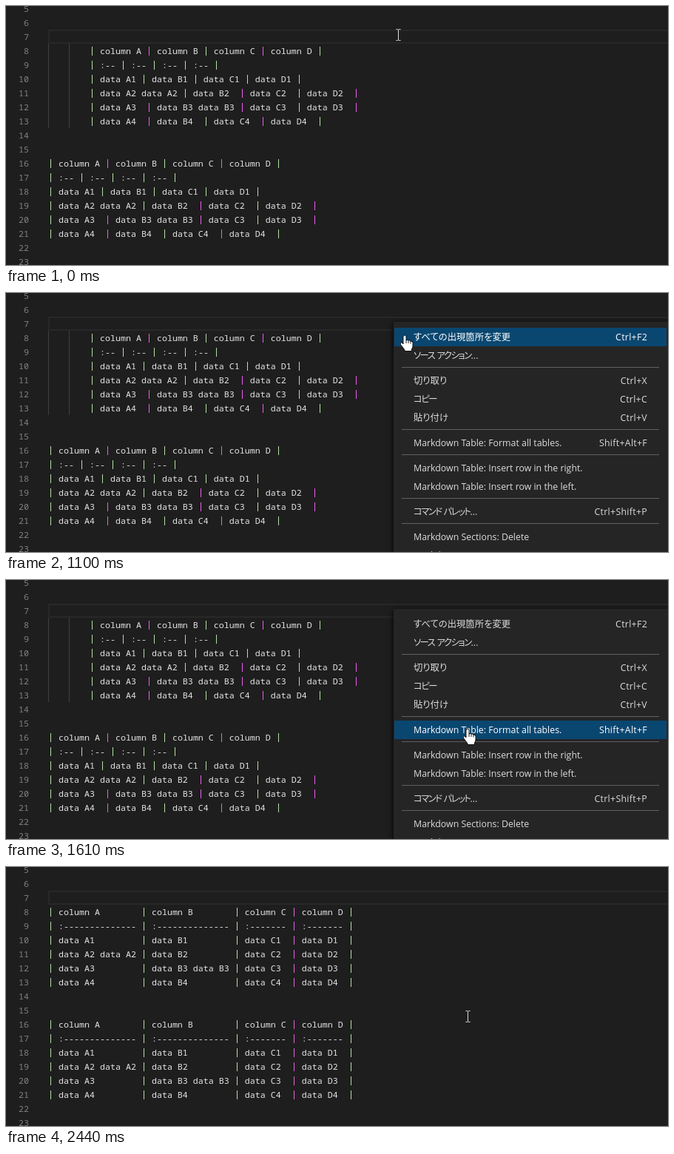
An HTML page that plays this animation: 895 px wide and 350 px high, repeating every 2820 ms.

```html
<!DOCTYPE html>
<html lang="ja">
<head>
<meta charset="utf-8">
<title>Format tables</title>
<style>
html, body { margin: 0; width: 100%; height: 100%; overflow: hidden; background: #1e1e1e; }
#stage { position: absolute; left: 0; top: 0; width: 895px; height: 350px; overflow: hidden; }
#stage div, #stage svg { position: absolute; }
.line, .num {
  font: 11.667px/19px "Noto Sans Mono", monospace; font-variant-ligatures: none;
  height: 19px; white-space: pre; color: #e4e4e4;
}
.line { left: 57px; }
.num { left: 0; width: 31px; text-align: right; color: #808080; }
.line i {
  display: inline-block; width: 7px; height: 19px; vertical-align: top; color: transparent;
  background: linear-gradient(#b4e0a8, #b4e0a8) 3px 4px / 1px 12px no-repeat;
}
.line i.odd { background-image: linear-gradient(#ee5cee, #ee5cee); }
#current { left: 57px; top: 32px; width: 860px; height: 15px; border: 2px solid #282828; }
#caret { left: 57px; top: 32px; width: 2px; height: 19px; background: #aeafad; }
.guide { top: 51px; width: 1px; height: 114px; background: #404040; }
#menu { left: 524px; top: 39px; width: 371px; height: 330px; background: #252526; box-shadow: 0 2px 8px #000; }
.item {
  left: 1px; width: 368px; height: 25px; color: #dcdcdc; white-space: pre;
  font: 12.35px/26px "Open Sans", "Noto Sans CJK JP", sans-serif; font-feature-settings: "palt";
}
.item.on { background: #094771; color: #fff; }
.item span { position: absolute; left: 26px; }
.item span + span { left: auto; right: 26px; letter-spacing: .3px; }
.item b { font-weight: 400; letter-spacing: -1.5px; }
.rule { left: 11px; width: 348px; height: 1px; background: #606061; }
#click { width: 24px; height: 24px; margin: -12px; border-radius: 50%; background: rgba(255, 255, 0, .5); }
#pointer { left: 0; top: 0; overflow: visible; }
</style>
</head>
<body>
<div id="stage">
  <div id="current"></div>
  <div class="guide" style="left:57px"></div>
  <div class="guide" style="left:85px"></div>
  <div id="text"></div>
  <div id="caret"></div>
  <div id="menu"></div>
  <div id="click"></div>
  <svg id="pointer" width="1" height="1">
    <path id="beam" fill="none" stroke="#dedede" d="M-3-7.5H-1L0-7L1-7.5H3M0-7V7M-3 7.5H-1L0 7L1 7.5H3"/>
    <path id="arrow" fill="#fff" stroke="#000" stroke-width=".8" d="M0 0V16.5L3.8 13L6.5 19L9 18L6.4 12H11.7Z"/>
    <path id="hand" fill="#fff" stroke="#000" stroke-width=".9" d="M-2 2Q-2 0 0 0Q2 0 2 2V7Q3 6 5 7Q7 6.6 8 8Q11 8 11 10.5V15Q11 17 9.5 19V21.5H0V20L-5.5 12.5Q-6.5 10.5-4.5 10Q-3 10-2 12ZM2 7V11M5 7.3V11M8 8V11.5"/>
  </svg>
</div>
<script>
const $ = id => document.getElementById(id);
const LOOP = 2820;

const loose = [
  '| column A | column B | column C | column D |',
  '| :-- | :-- | :-- | :-- |',
  '| data A1 | data B1 | data C1 | data D1 |',
  '| data A2 data A2 | data B2  | data C2  | data D2  |',
  '| data A3  | data B3 data B3 | data C3  | data D3  |',
  '| data A4  | data B4  | data C4  | data D4  |'
];

function format(lines) {
  const rows = lines.map(l => l.split('|').slice(1, -1).map(c => c.trim()));
  const widths = rows[0].map((_, i) => Math.max(...rows.map(r => r[i].length)));
  return rows.map(r => '| ' + r.map((c, i) =>
    c.padEnd(widths[i], c[0] === ':' ? '-' : ' ')).join(' | ') + ' |');
}

function add(parent, cls, top, html) {
  const el = document.createElement('div');
  el.className = cls;
  el.style.top = top + 'px';
  el.innerHTML = html;
  parent.append(el);
  return el;
}

const lineTop = n => 32 + (n - 7) * 19;
const paint = s => s.replace(/\|/g, (_, i) => `<i class="${i % 2 ? 'odd' : ''}">|</i>`);

function addTables(first, second) {
  const group = add($('text'), '', 0, '');
  first.forEach((s, i) => add(group, 'line', lineTop(8 + i), paint(s)));
  second.forEach((s, i) => add(group, 'line', lineTop(16 + i), paint(s)));
  return group;
}

for (let n = 5; n <= 23; n++) add($('text'), 'num', lineTop(n), n);
const before = addTables(loose.map(s => ' '.repeat(8) + s), loose);
const after = addTables(format(loose), format(loose));

// Menu entries are 25px tall; an empty entry is a 9px separator.
const MENU_TOP = 39;
const items = [];
let rowTop = 8;
[
  ['すべての出現箇所を変更', 'Ctrl+F2'],
  ['ソース アクション...'],
  [],
  ['切り取り', 'Ctrl+X'],
  ['コピー', 'Ctrl+C'],
  ['貼り付け', 'Ctrl+V'],
  [],
  ['Markdown Table: Format all tables.', 'Shift+Alt+F'],
  [],
  ['Markdown Table: Insert row in the right.'],
  ['Markdown Table: Insert row in the left.'],
  [],
  ['コマンド パレット...', 'Ctrl+Shift+P'],
  [],
  ['Markdown Sections: Delete'],
  ['Markdown Sections: Down']
].forEach(([label, keys = '']) => {
  if (!label) {
    add($('menu'), 'rule', rowTop + 3, '');
    rowTop += 9;
    return;
  }
  const text = label.replace(/[ァ-ヶー]+/g, '<b>$&</b>');
  const el = add($('menu'), 'item', rowTop, `<span>${text}</span><span>${keys}</span>`);
  items.push({ top: MENU_TOP + rowTop, el });
  rowTop += 25;
});

const show = (el, on) => { el.style.visibility = on ? 'visible' : 'hidden'; };
const mix = (a, b, u) => a + (b - a) * u;

// Pointer travel through the menu: one quick sweep, then a slow settle.
function sweep(t) {
  const k = Math.min(11, Math.floor((t - 1100) / 46.3));
  if (k <= 6) {
    const u = 1 - (1 - k / 6) ** 1.3;
    return [Math.round(mix(539, 618, u)), Math.round(mix(57, 181, u))];
  }
  const u = 1 - (1 - (k - 6) / 5) ** 2;
  return [Math.round(mix(618, 624, u)), Math.round(mix(181, 201, u))];
}

function pointerAt(t) {
  if (t < 80) return [530.5, 39];
  if (t < 230) return [529.5, 39];
  if (t < 870) return [527.5, 39];
  if (t < 1100) return [527, 39];
  if (t < 1930) return sweep(t);
  return [624.5, 202];
}

function draw(t) {
  const open = t >= 870 && t < 1930;
  const [x, y] = pointerAt(t);
  let hover = false;
  for (const { top, el } of items) {
    const on = open && y >= top && y < top + 25;
    el.classList.toggle('on', on);
    hover = hover || on;
  }
  show($('menu'), open);
  show(before, t < 1980);
  show(after, t >= 1980);
  document.querySelectorAll('.guide').forEach(g => show(g, t < 1980));
  show($('caret'), t >= 1930 && t < 2440);

  show($('click'), (t >= 740 && t < 820) || (t >= 1840 && t < 1930));
  $('click').style.left = (t < 1000 ? 525 : 623) + 'px';
  $('click').style.top = (t < 1000 ? 38 : 201) + 'px';

  $('pointer').style.transform = `translate(${x}px, ${y}px)`;
  show($('beam'), !open);
  show($('arrow'), open && !hover);
  show($('hand'), hover);
}

function tick() {
  draw(performance.now() % LOOP);
  requestAnimationFrame(tick);
}
tick();
</script>
</body>
</html>
```
